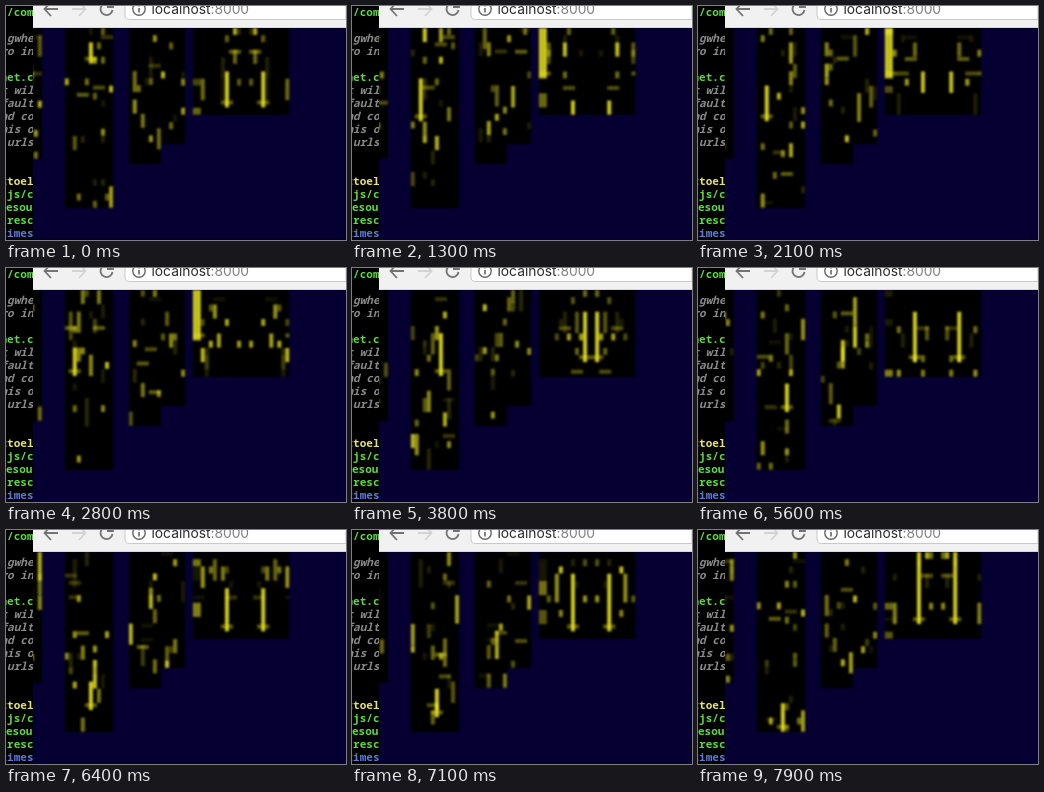
An HTML page with a canvas that plays this animation: 340 by 234 pixels, repeating every 8 s.

```html
<!DOCTYPE html>
<html lang="en">
<head>
<meta charset="utf-8">
<title>Night skyline</title>
<style>
  html, body { margin: 0; width: 340px; height: 234px; overflow: hidden; background: #000; }
  canvas, svg { position: absolute; left: 0; top: 0; display: block; }
  .term { font: bold 11px "Noto Sans Mono", "DejaVu Sans Mono", monospace; white-space: pre; }
  .url { font: 13.8px Inter, sans-serif; }
</style>
</head>
<body>
<canvas id="city" width="340" height="234"></canvas>
<svg width="340" height="234" viewBox="0 0 340 234">
  <rect width="27" height="234" fill="#000"/>
  <svg id="term" class="term" width="27" height="234"></svg>
  <rect x="27" width="313" height="22" fill="#f1f1f1"/>
  <path d="M27 21.5H340" stroke="#d8d8da"/>
  <path d="M340 13.5H123.500Q119 13.500 119 9V-2H340Z" fill="#fff" stroke="#c9c9c9"/>
  <g fill="none" stroke-width="1.8">
    <path d="M52 3H39M45 -4L38.500 3L45 10" stroke="#737373"/>
    <path d="M66 3H79M73 -4L79.500 3L73 10" stroke="#d3d3d3"/>
    <path d="M106.500 4A6 6 0 1 1 104.500 -1.500M107 -5V1H101" stroke="#737373"/>
    <circle cx="133" cy="3" r="6.200" stroke="#666" stroke-width="1.400"/>
    <path d="M133 2V6.500M133 -1V.6" stroke="#666" stroke-width="1.600"/>
  </g>
  <text class="url" x="145.500" y="8" fill="#2b2b2b">localhost<tspan fill="#808080">:8000</tspan></text>
</svg>
<script>
const STEP = 100, STEPS = 80, SPAN = 8, CELL = 4.03, TOP = 22;
const GREEN = '#5ed943', GREY = '#898989', YELLOW = '#e6e36b', BLUE = '#5b78dc';

const lines = [
  [' /com', 10, GREEN], [' gwhe', 36, GREY], ['ro in', 49, GREY],
  ['net.c', 75, GREEN], ['t will', 88, GREY], ['fault', 101, GREY],
  ['nd co', 114, GREY], ['his o', 127, GREY], [' urls', 140, GREY],
  ['ttoel', 179, YELLOW], [' js/c', 192, GREEN], ['esou', 205, GREEN],
  [' resc', 218, GREEN], ['times', 231, BLUE]
];
for (const [text, y, fill] of lines) {
  const el = document.createElementNS('http://www.w3.org/2000/svg', 'text');
  el.textContent = text;
  el.setAttribute('x', text.length === 4 ? 0 : -5.5);
  el.setAttribute('y', y);
  el.setAttribute('fill', fill);
  el.style.whiteSpace = 'pre';
  if (fill === GREY) el.style.fontStyle = 'italic';
  document.getElementById('term').append(el);
}

// A pillar of light glides between key points: [step, column, row, length].
const towers = [
  { x: -12.5, bottom: 153, cols: 12, rows: 18 },
  { x: 58.7, bottom: 202, cols: 12, rows: 25, pillar: [
    [0, 6, 2, 3], [13, 2, 7, 6], [28, 2, 8, 4], [38, 7, 6, 6],
    [48, 7, 7, 4], [64, 6, 18, 4], [79, 6, 21, 4]] },
  { x: 122.7, bottom: 158, cols: 8, rows: 19 },
  { x: 155, bottom: 138, cols: 6, rows: 16 },
  { x: 186.7, bottom: 109, cols: 24, rows: 12, mirror: true, pillar: [
    [0, 8, 6, 5], [13, 1, 0, 7], [28, 1, 0, 7], [38, 11, 3, 7],
    [48, 6, 0, 7], [64, 8, 5, 6], [79, 8, 0, 10]] }
];

const ctx = document.getElementById('city').getContext('2d');
const layer = document.createElement('canvas');
layer.width = 340;
layer.height = 234;
const pen = layer.getContext('2d');

function random(seed) {
  let s = Math.imul(seed + 1, 2654435761);
  return () => {
    s = s + 0x6d2b79f5 | 0;
    let v = Math.imul(s ^ s >>> 15, 1 | s);
    v ^= v + Math.imul(v ^ v >>> 7, 61 | v);
    return ((v ^ v >>> 14) >>> 0) / 4294967296;
  };
}

function along(keys, step) {
  const i = keys.findIndex(k => k[0] >= step);
  const b = keys[i], a = keys[Math.max(0, i - 1)];
  const u = a === b ? 1 : (step - a[0]) / (b[0] - a[0]);
  const ease = u * u * (3 - 2 * u);
  return a.slice(1).map((v, n) => Math.round(v + (b[n + 1] - v) * ease));
}

function light(tower, col, row, w, h, level) {
  const { x, cols, rows, bottom, mirror } = tower;
  const unit = (bottom - TOP) / rows;
  const thin = w > h ? 0.55 : 0.95;
  const paint = c => pen.fillRect(x + c * CELL, TOP + row * unit, w * CELL, (h - 1 + thin) * unit);
  pen.fillStyle = `rgba(240,236,34,${level})`;
  paint(col);
  if (mirror) paint((26 - col - w + cols) % cols);
}

// Each slot lights one streak at a time, fading in and out.
function drawStreaks(tower, id, step) {
  const { cols, rows, mirror } = tower;
  const width = mirror ? cols / 2 : cols;
  const slots = Math.round(width * rows / 13);
  for (let i = 0; i < slots; i++) {
    const age = (step + i * 3) % STEPS;
    const next = random(id * 10000 + i * 100 + Math.floor(age / SPAN));
    const flat = next() < 0.15;
    const w = flat ? 3 : 1;
    const h = flat ? 1 : 1 + Math.floor(next() * next() * 4);
    const col = Math.floor(next() * (width - w + 1));
    const row = Math.floor(next() * (rows - h + 1));
    const fade = Math.sin(Math.PI * (age % SPAN + 0.5) / SPAN);
    light(tower, col, row, w, h, fade * (flat ? 0.4 : 0.45 + 0.4 * next()));
  }
}

function draw(step) {
  pen.fillStyle = '#050031';
  pen.fillRect(0, 0, 340, 234);
  towers.forEach((tower, id) => {
    pen.save();
    pen.beginPath();
    pen.rect(tower.x, TOP, tower.cols * CELL, tower.bottom - TOP);
    pen.clip();
    pen.fillStyle = '#000';
    pen.fill();
    drawStreaks(tower, id, step);
    if (tower.pillar) {
      const [col, row, len] = along(tower.pillar, step);
      light(tower, col, row, 1, len, 0.85);
      light(tower, col - 1, row + len - 1, 3, 1, 0.4);
    }
    pen.restore();
  });
  ctx.filter = 'blur(1.2px)';
  ctx.drawImage(layer, 0, 0);
}

let shown = -1;
function tick() {
  const step = Math.floor(performance.now() / STEP) % STEPS;
  if (step !== shown) draw(shown = step);
  requestAnimationFrame(tick);
}
tick();
</script>
</body>
</html>
```
